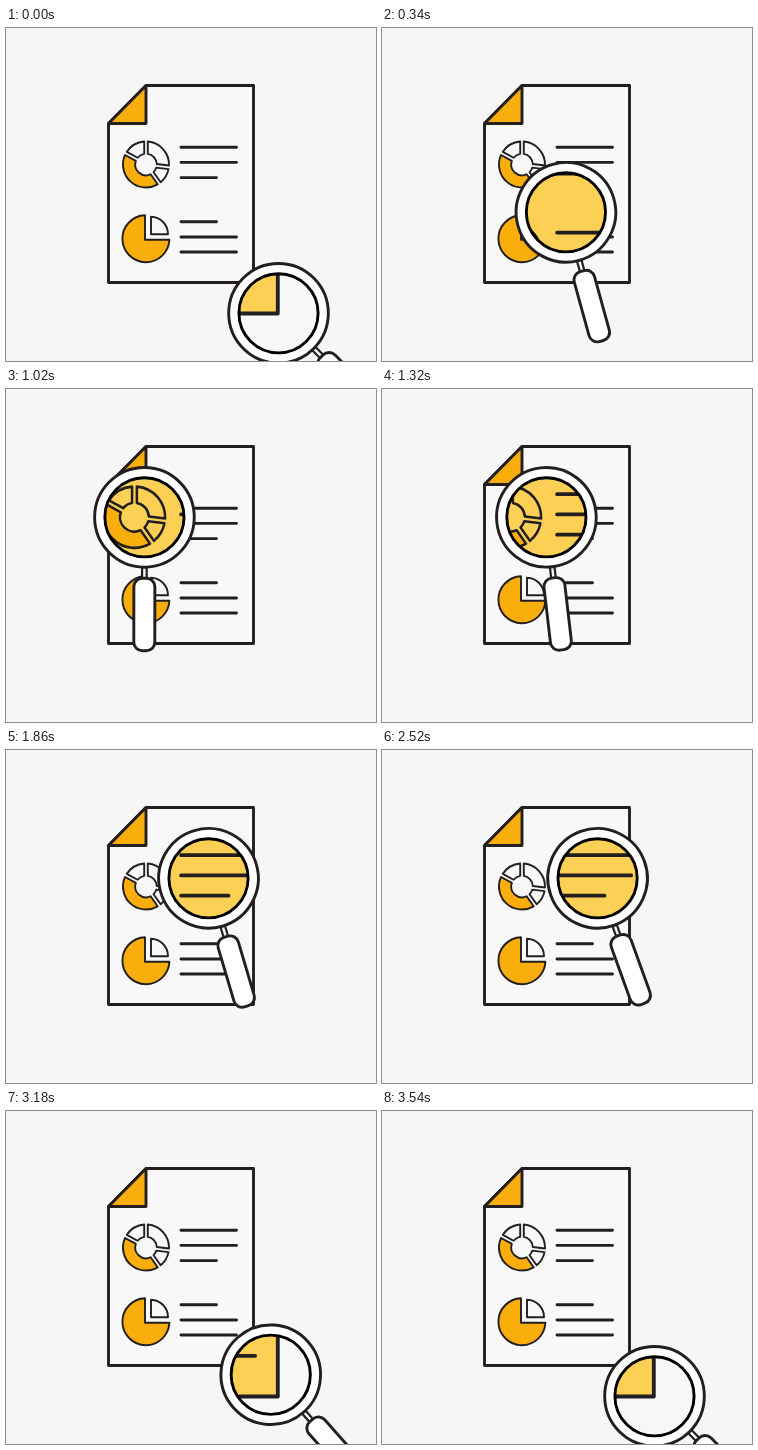
Write an HTML page that moves like this. It is 370 px wide and 333 px high and loops after 3730 ms.

```html
<!DOCTYPE html>
<html lang="en">
<head>
<meta charset="utf-8">
<title>Report under a magnifier</title>
<style>
  html, body { margin: 0; width: 100%; height: 100%; overflow: hidden; background: #f6f6f6; }
  svg { display: block; width: 370px; height: 333px; }
  .page { fill: var(--paper); }
  .ink { stroke: #231f20; stroke-width: 2.9; stroke-linejoin: round; stroke-linecap: round; }
  .thin { stroke-width: 1.9; }
  .hot { fill: #f9ae0b; }
</style>
</head>
<body>
<svg viewBox="0 0 370 333">
  <defs>
    <clipPath id="glass"><circle id="hole" r="39.5"/></clipPath>
    <g id="sheet">
      <path class="ink page" d="M102.5 95.5 140 57.5H247.5V254.5H102.5Z"/>
      <path class="ink hot" d="M102.5 95.5 140 57.5V95.5Z"/>
      <g id="donut" class="ink thin page"></g>
      <path class="ink thin hot" d="M139 187.2A23.5 23.5 0 1 0 163.4 211.8H139Z"/>
      <path class="ink thin page" d="M145 188.8A17.3 17.3 0 0 1 162 206.2H145Z"/>
      <path class="ink" fill="none" d="M175 119.2H230.5M175 134.4H230.5M175 149.6H210.5M175 193.8H210.5M175 209H230.5M175 224H230.5"/>
    </g>
  </defs>
  <use href="#sheet" style="--paper:#f8f8f8"/>
  <g id="lens">
    <path class="ink" style="stroke-width:2.2" fill="#f6f6f6" d="M-2.3 50H2.3V62H-2.3Z"/>
    <rect class="ink" fill="#fff" x="-10.5" y="61" width="21" height="72.5" rx="8.5"/>
    <circle class="ink" fill="#fff" r="49.8"/>
    <circle fill="#f7f7f7" r="39.5"/>
  </g>
  <g clip-path="url(#glass)">
    <use href="#sheet" transform="translate(-58.2 -53.8) scale(1.3333)" style="--paper:#fcd055"/>
  </g>
  <circle id="rim" r="39.6" fill="none" stroke="#000" stroke-width="2.9"/>
</svg>
<script>
const $ = id => document.getElementById(id);
const LOOP = 3730;

// Ring slices: clockwise angles from the top, separated by parallel gaps.
function slice(from, to, cls) {
  const R = 23, r = 10.8, gap = 1.8, rad = Math.PI / 180;
  const at = (radius, deg, side) => {
    const a = deg * rad + side * Math.asin(gap / radius);
    return (140 + radius * Math.sin(a)).toFixed(2) + ' ' + (136.5 - radius * Math.cos(a)).toFixed(2);
  };
  const path = document.createElementNS('http://www.w3.org/2000/svg', 'path');
  path.setAttribute('d', `M${at(R, from, 1)}A${R} ${R} 0 0 1 ${at(R, to, -1)}` +
    `L${at(r, to, -1)}A${r} ${r} 0 0 0 ${at(r, from, 1)}Z`);
  if (cls) path.setAttribute('class', cls);
  $('donut').append(path);
}
slice(0, 97);
slice(97, 145);
slice(145, 299, 'hot');
slice(299, 360);

// cubic-bezier(.25, .1, .25, 1)
function ease(p) {
  const curve = (a, b, u) => 3 * a * u * (1 - u) ** 2 + 3 * b * u * u * (1 - u) + u ** 3;
  let lo = 0, hi = 1;
  for (let i = 0; i < 24; i++) {
    const mid = (lo + hi) / 2;
    if (curve(.25, .25, mid) < p) lo = mid; else hi = mid;
  }
  return curve(.1, 1, lo);
}

// time, x, y, handle angle
const stops = [
  [0, 272.5, 285.3, 45],
  [910, 134.8, 128.3, -1],
  [2690, 216, 128.3, 20],
  [2705, 216, 128.3, 20],
  [3540, 272.5, 285.3, 45],
  [LOOP, 272.5, 285.3, 45]
];

function pose(t) {
  const i = stops.findIndex(s => s[0] > t);
  const a = stops[i - 1], b = stops[i];
  const k = ease((t - a[0]) / (b[0] - a[0]));
  return [1, 2, 3].map(n => a[n] + (b[n] - a[n]) * k);
}

function draw(t) {
  const [x, y, angle] = pose(t % LOOP);
  const move = `translate(${x} ${y})`;
  $('lens').setAttribute('transform', `${move} rotate(${-angle})`);
  $('hole').setAttribute('transform', move);
  $('rim').setAttribute('transform', move);
}

let start;
function tick(now) {
  start ??= now;
  draw(Math.max(0, now - start));
  requestAnimationFrame(tick);
}
draw(0);
requestAnimationFrame(tick);
</script>
</body>
</html>
```
